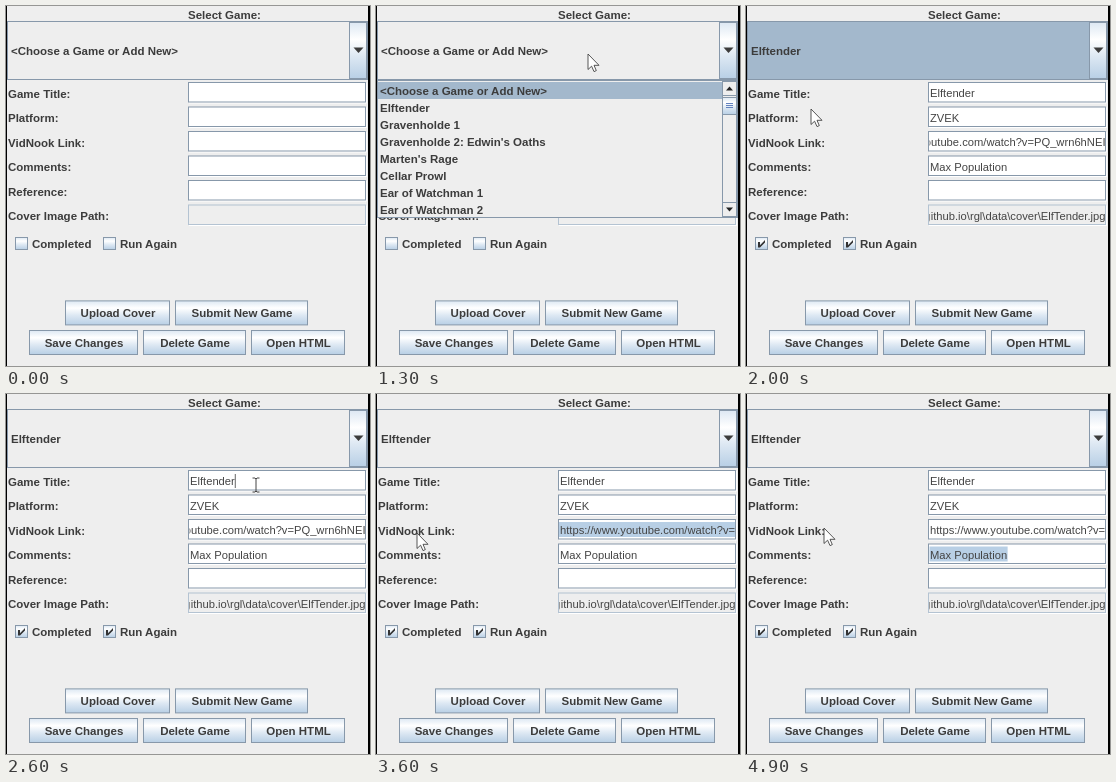
An HTML page for the animation above (5000 ms loop, 364 px wide and 360 px high).

```html
<!DOCTYPE html>
<html lang="en">
<head>
<meta charset="utf-8">
<title>Game list editor</title>
<style>
html, body { margin: 0; width: 100%; height: 100%; overflow: hidden; background: #eee; }
svg { display: block; width: 364px; height: 360px; }
text { font: 11.2px "Liberation Sans", Arial, sans-serif; fill: #444; white-space: pre; }
.b { font-weight: bold; font-size: 11.5px; fill: #3c3c3c; }
</style>
</head>
<body>
<svg id="stage" viewBox="0 0 364 360">
  <defs>
    <linearGradient id="ocean" x1="0" y1="0" x2="0" y2="1">
      <stop offset="0" stop-color="#dde8f3"/>
      <stop offset=".3" stop-color="#fff"/>
      <stop offset=".6" stop-color="#dde8f3"/>
      <stop offset="1" stop-color="#b8cfe5"/>
    </linearGradient>
    <clipPath id="inner"><rect x="183.5" y="70" width="176" height="160"/></clipPath>
  </defs>
</svg>
<script>
const NS = 'http://www.w3.org/2000/svg';
const stage = document.getElementById('stage');
const EDGE = '#8798aa', SOFT_EDGE = '#b4c3d2', PICK = '#a3b8cc', MARK = '#b8cfe5', OCEAN = 'url(#ocean)';
const LOOP = 5000, STEP = 100;

function add(tag, attrs, parent = stage) {
  const el = document.createElementNS(NS, tag);
  for (const k in attrs) el.setAttribute(k, attrs[k]);
  parent.appendChild(el);
  return el;
}
const rect = (x, y, width, height, fill, parent) =>
  add('rect', { x, y, width, height, fill }, parent);
const box = (x, y, w, h, fill, parent, edge = EDGE) => {
  const el = rect(x + .5, y + .5, w - 1, h - 1, fill, parent);
  el.setAttribute('stroke', edge);
  return el;
};
const path = (d, fill, parent) => add('path', { d, fill }, parent);
function label(x, y, str, attrs = {}, parent = stage) {
  const el = add('text', { x, y, ...attrs }, parent);
  el.textContent = str;
  return el;
}
const bold = (x, y, str, parent) => label(x, y, str, { class: 'b' }, parent);
const show = (el, on) => el.setAttribute('display', on ? 'inline' : 'none');

bold(182, 13, 'Select Game:');

// combo box
box(1, 15, 361, 59, '#eee');
const comboFill = rect(2, 16, 341, 57, PICK);
box(343, 16, 18, 57, OCEAN);
path('M347.5 41.5h10l-5 5.5z', '#3c3c3c');
const comboText = bold(5, 49, '');

// form rows
const TITLE = 'Elftender';
const LINK = 'https://www.youtube.com/watch?v=PQ_wrn6hNEI';
const rowY = i => 76 + 24.5 * i;
// sunken field: dark frame with a white lip on the lower right
function field(y, enabled) {
  rect(183, y + 1, 178, 20.5, '#fff');
  box(182, y, 178, 20.5, enabled ? '#fff' : '#eee', stage, enabled ? EDGE : SOFT_EDGE);
}
['Game Title:', 'Platform:', 'VidNook Link:', 'Comments:', 'Reference:', 'Cover Image Path:']
  .forEach((s, i) => {
    bold(2, rowY(i) + 15.5, s);
    field(rowY(i), i < 5);
  });

const linkMark = rect(183, rowY(2) + 3, 176, 15, MARK);
const noteMark = rect(183.5, rowY(3) + 3, 76, 15, MARK);
const values = add('g', { 'clip-path': 'url(#inner)' });
const value = (i, str, end) =>
  label(end ? 359.5 : 184, rowY(i) + 15.3, str, end ? { 'text-anchor': 'end' } : {}, values);
const title = value(0, TITLE);
const platform = value(1, 'ZVEK');
const linkHome = value(2, LINK);
const linkEnd = value(2, LINK, true);
const note = value(3, 'Max Population');
const cover = value(5, 'github.io\\rgl\\data\\cover\\ElfTender.jpg', true);
const caret = rect(0, 0, 1, 14, '#666');

// check boxes
const ticks = [[9, 'Completed'], [97, 'Run Again']].map(([x, s]) => {
  box(x, 231, 13, 13, OCEAN);
  bold(x + 17, 242, s);
  return path(`M${x + 3} 236h2v3.2l5-5.2v2.4l-5 5.2h-2z`, '#333');
});

// buttons
const BTN_Y = 294.4, BTN_PITCH = 29.6;
[[59, 0, 105, 'Upload Cover'], [169, 0, 133, 'Submit New Game'],
 [23, 1, 109, 'Save Changes'], [137, 1, 103, 'Delete Game'], [245, 1, 94, 'Open HTML']]
  .forEach(([x, row, w, s]) => {
    const y = BTN_Y + BTN_PITCH * row;
    box(x, y, w, 25, OCEAN);
    label(x + w / 2 + .5, y + 17, s, { class: 'b', 'text-anchor': 'middle' });
  });

// drop-down list
const ROW = 17, LIST_Y = 76;
const list = add('g', {});
box(1, 74, 361, 138, '#eee', list);
const listMark = rect(2, 0, 344, ROW, PICK, list);
['<Choose a Game or Add New>', TITLE, 'Gravenholde 1', "Gravenholde 2: Edwin's Oaths",
 "Marten's Rage", 'Cellar Prowl', 'Ear of Watchman 1', 'Ear of Watchman 2']
  .forEach((s, i) => bold(4, LIST_Y + 12.5 + ROW * i, s, list));
box(346, 75, 15, 136, '#eee', list);
box(346, 75, 15, 15, '#eee', list);
box(346, 196, 15, 15, '#eee', list);
path('M350 84.5h7l-3.5-4z', '#222', list);
path('M350 201.5h7l-3.5 4z', '#222', list);
box(346, 91, 15, 18, OCEAN, list);
for (const y of [97, 99, 101]) rect(350, y, 7, 1, '#6382bf', list);

// window edges
rect(0, 0, 1, 360, '#000');
rect(362, 0, 2, 360, '#000');

// pointers
const arrow = add('path', {
  d: 'M0 0V15.5L3.6 12.2L6 17.6L8.3 16.6L6 11.3H11z',
  fill: '#fff', stroke: '#444', 'stroke-width': .9, 'stroke-linejoin': 'round'
});
const beam = add('path', {
  d: 'M-3.5 -7H-1L0 -6L1 -7H3.5M0 -6V6M-3.5 7H-1L0 6L1 7H3.5',
  fill: 'none', stroke: '#444', 'stroke-width': 1
});

// time, x, y
const track = [
  [300, 84, 331], [400, 229, 312], [1300, 212, 48], [1700, 65, 103], [2000, 65, 103],
  [2200, 120, 295], [2300, 170, 240], [2500, 238, 108], [2600, 250, 91], [2800, 246, 92],
  [3100, 210, 120], [3300, 340, 137], [3600, 41, 139], [3700, 41, 139], [4000, 225, 112],
  [4200, 319, 296], [4300, 294, 162], [4400, 272, 161], [4700, 18, 145], [4900, 78, 134]
];
function pointer(t) {
  const i = track.findIndex(k => k[0] > t);
  if (i < 0) return track[track.length - 1].slice(1);
  const [t0, x0, y0] = track[i - 1], [t1, x1, y1] = track[i];
  const p = (t - t0) / (t1 - t0);
  return [x0 + (x1 - x0) * p, y0 + (y1 - y0) * p];
}

function span(el, from, to) {
  el.setAttribute('x', from);
  el.setAttribute('width', to - from);
}

function draw(now) {
  const t = Math.floor(now % LOOP / STEP) * STEP;
  const within = (a, b) => t >= a && t < b;
  const visible = within(300, 500) || t >= 1300;
  const [x, y] = visible ? pointer(t) : [0, 0];
  const loaded = t >= 2000;

  show(comboFill, within(2000, 2600));
  comboText.textContent = loaded ? TITLE : '<Choose a Game or Add New>';
  for (const el of [title, platform, note, cover, ...ticks]) show(el, loaded);
  show(linkEnd, within(2000, 3500));
  show(linkHome, t >= 3500);

  show(list, within(1300, 2000));
  const row = Math.max(0, Math.floor((y - LIST_Y) / ROW));
  listMark.setAttribute('y', LIST_Y + ROW * row);

  show(linkMark, within(3400, 4000));
  span(linkMark, within(3400, 3700) ? Math.min(359, Math.max(183, x)) : 183, 359);

  const noteEnd = 184.5 + (loaded ? note.getComputedTextLength() : 0);
  show(noteMark, t >= 4400);
  span(noteMark, t >= 4700 ? 183.5 : Math.min(noteEnd, Math.max(183.5, x)), noteEnd);

  const focus = within(2600, 3000) ? title
    : within(3000, 3300) || within(4000, 4300) ? platform : null;
  show(caret, focus);
  if (focus) {
    caret.setAttribute('x', 184 + focus.getComputedTextLength());
    caret.setAttribute('y', rowY(focus === title ? 0 : 1) + 4);
  }

  const overField = loaded && x > 182 && x < 361 && y > 76 && y < 219;
  show(arrow, visible && !overField);
  show(beam, visible && overField);
  const move = `translate(${x} ${y})`;
  arrow.setAttribute('transform', move);
  beam.setAttribute('transform', move);
}

const start = performance.now();
function tick() {
  draw(performance.now() - start);
  requestAnimationFrame(tick);
}
tick();
</script>
</body>
</html>
```
